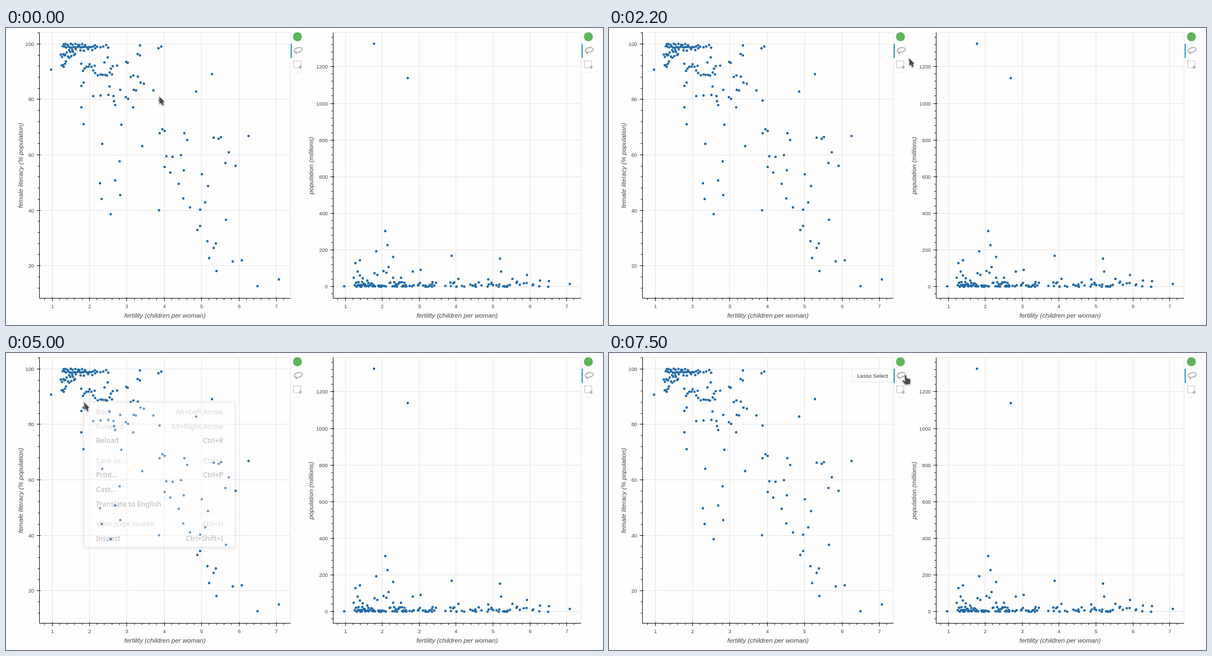
Recreate the animation shown at these times as an HTML page. Size 1061 px wide and 528 px high, loop 8000 ms.

```html
<!DOCTYPE html>
<html lang="en">
<head>
<meta charset="utf-8">
<title>Linked scatter plots</title>
<style>
  html, body { margin: 0; height: 100%; overflow: hidden; background: #fefefe; }
  svg { display: block; width: 1061px; height: 528px; }
  text { font: 9.3px "Liberation Sans", Arial, sans-serif; fill: #444; dominant-baseline: central; }
  .middle { text-anchor: middle; }
  .end { text-anchor: end; }
  .title { font-size: 11.5px; font-style: italic; text-anchor: middle; }
  .grid { stroke: #e5e5e5; fill: none; }
  .axis { stroke: #111; fill: none; }
  .dot { fill: #1f6aa9; }
  .icon { stroke: #a4a4a4; fill: none; stroke-width: 1.5; }
  .tip rect { fill: #fefefe; stroke: #e6e6e6; }
  .tip text { font-size: 9.6px; fill: #333; }
  .menu rect { fill: #fff; stroke: #c4c4c4; filter: drop-shadow(0 1px 3px #0005); }
  .menu text { font: 12.6px "Noto Sans", sans-serif; fill: #2e2e2e; }
  .menu .off { fill: #999; }
  .cursor { fill: #4c4c4c; stroke: #eee; stroke-width: .7; filter: drop-shadow(0 1px 1px #0004); }
</style>
</head>
<body>
<svg id="stage" viewBox="0 0 1061 528"></svg>
<script>
const stage = document.getElementById('stage');

function add(parent, tag, attrs = {}, text = '') {
  const node = document.createElementNS('http://www.w3.org/2000/svg', tag);
  for (const key in attrs) node.setAttribute(key, attrs[key]);
  node.textContent = text;
  return parent.appendChild(node);
}
const label = (parent, x, y, text, cls = '') => add(parent, 'text', { x, y, class: cls }, text);
const path = (parent, d, cls) => add(parent, 'path', { d, class: cls });
const group = cls => add(stage, 'g', { class: cls });
const show = (node, visible) => node.setAttribute('visibility', visible ? 'visible' : 'hidden');
const snap = v => Math.floor(v) + 0.5;

let seed = 77;
const random = () => (seed = seed * 16807 % 2147483647) / 2147483647;
const pairs = list => list.flatMap((x, i) => i % 2 ? [] : [[x, list[i + 1]]]);

// Scattered countries: fertility against literacy
const sparse = pairs([
  80,74, 238,31, 271,36, 276,33, 366,82,
  134,103, 138,97, 155,121, 168,120, 134,141, 138,171, 171,206, 167,276, 170,304, 186,331,
  184,104, 182,119, 191,121, 192,130, 194,137, 203,110, 213,123, 217,126, 227,110, 231,111,
  226,141, 205,172, 202,237, 194,271, 203,297, 239,97, 245,99, 262,111, 242,210, 273,129,
  338,113, 278,180, 282,183, 273,187, 285,228, 296,229, 311,226, 282,247, 292,257, 316,253,
  317,187, 322,199, 307,277, 315,303, 327,319, 272,324, 348,260, 359,281, 354,310, 345,323,
  345,352, 340,359, 369,195, 378,197, 382,194, 431,192, 396,221, 390,240, 408,245, 391,341,
  358,379, 373,383, 369,391, 361,409, 403,415, 419,413, 374,432, 447,459, 485,447
]);

// Crowded regions: count, x range, y range
const crowded = [
  [18, 100, 156, 32, 35], [10, 100, 142, 28, 31], [6, 156, 184, 30, 35], [8, 107, 163, 36, 41],
  [13, 96, 124, 42, 53], [5, 98, 108, 59, 71], [9, 133, 159, 61, 78], [8, 157, 190, 79, 88],
  [5, 172, 199, 48, 77], [2, 213, 217, 59, 62], [3, 216, 240, 83, 90], [2, 232, 240, 45, 54]
].flatMap(([n, x0, x1, y0, y1]) => Array.from({ length: n }, (_, i) => [
  x0 + (x1 - x0) * (i + 0.25 + random() * 0.5) / n,
  y0 + (y1 - y0) * random()
]));

const countries = [...sparse, ...crowded];

// Countries with a large population
const populous = pairs([
  654,28, 714,89, 674,361, 678,386, 658,397, 688,407, 629,413, 621,418, 680,425, 792,405,
  878,410, 737,430, 723,433, 625,433, 671,432, 676,435, 655,436, 660,439, 880,433, 926,439,
  900,446, 804,446, 857,447, 688,444, 702,444, 618,444, 629,440, 634,445, 642,449, 965,450,
  949,449, 937,456, 1002,455
]);
const small = countries
  .map(([x]) => [603 + (x - 82) * 0.988, 460 - 9 * random() ** 2])
  .filter(([x]) => !populous.some(p => Math.abs(p[0] - x) < 0.9));

function plot({ left, right, x1, dx, y0, perUnit, step, from, to, titleX, title, points }) {
  const top = 8, bottom = 480.5;
  const xAt = v => snap(x1 + (v - 1) * dx), yAt = v => snap(y0 - v * perUnit);
  add(stage, 'rect', { x: left, y: top, width: right - left, height: bottom - top, class: 'grid' });
  path(stage, `M${left} ${top}V${bottom}H${right}`, 'axis');

  for (let i = 0; ; i++) {
    const x = xAt(0.8 + i / 5 - 0.2 + 0.2);
    if (x > right) break;
    const major = i % 5 === 1;
    if (x < left) continue;
    if (major) {
      path(stage, `M${x} ${top}V${bottom}`, 'grid');
      label(stage, x, 494.5, (i + 4) / 5, 'middle');
    }
    path(stage, `M${x} ${major ? bottom - 2 : bottom}V${bottom + (major ? 5 : 3)}`, 'axis');
  }
  for (let i = from; i <= to; i++) {
    const y = yAt(i * step / 5), major = i % 5 === 0;
    if (major) {
      path(stage, `M${left} ${y}H${right}`, 'grid');
      label(stage, left - 9.5, y, i * step / 5, 'end');
    }
    path(stage, `M${major ? left + 2 : left} ${y}H${left - (major ? 5 : 3)}`, 'axis');
  }
  for (const [cx, cy] of points) add(stage, 'circle', { cx, cy, r: 2.2, class: 'dot' });

  label(stage, (left + right) / 2, 510.5, 'fertility (children per woman)', 'title');
  add(stage, 'text', { class: 'title', transform: `translate(${titleX} 244.5) rotate(-90)` }, title);
}

function toolbar(x) {
  const bar = add(stage, 'rect', { x: x - 12, y: 28, width: 2, height: 25, fill: '#2f96cc' });
  add(stage, 'circle', { cx: x, cy: 15.5, r: 8, fill: '#5fb45c' });
  add(stage, 'ellipse', { cx: x + 1.5, cy: 39, rx: 7.3, ry: 4.2, class: 'icon',
    transform: `rotate(-14 ${x + 1.5} 39)` });
  path(stage, `M${x - 4} 42q-1 2 1 2t1 3`, 'icon');
  add(stage, 'rect', { x: x - 6.5, y: 58.5, width: 12.5, height: 12.5, class: 'icon',
    'stroke-dasharray': '2 1.2', style: 'stroke-width:1.1' });
  path(stage, `M${x + 2} 69.5h6m-3 -3v6`, 'icon');
  path(stage, `M${x - 4} 78.5h9`, 'grid');
  return bar;
}

function tooltip(x, y, width, text) {
  const tip = group('tip');
  add(tip, 'rect', { x: x + 0.5, y: y + 0.5, width, height: 23 });
  label(tip, x + width / 2, y + 12, text, 'middle');
  return tip;
}

plot({ left: 59.5, right: 505.5, x1: 82, dx: 66.4, y0: 521.3, perUnit: 4.93, step: 20,
  from: 3, to: 26, titleX: 25.5, title: 'female literacy (% population)', points: countries });
plot({ left: 581.5, right: 1022, x1: 603, dx: 65.6, y0: 459.3, perUnit: 0.3253, step: 200,
  from: -1, to: 34, titleX: 542, title: 'population (millions)', points: [...populous, ...small] });

const lassoBar = toolbar(518);
toolbar(1035);
const lassoTip = tooltip(432, 28, 73, 'Lasso Select');
const boxTip = tooltip(957, 52, 65, 'Box Select');

const menu = group('menu');
add(menu, 'rect', { x: 138.5, y: 87.5, width: 268, height: 257.5 });
[
  [104, 'Back', 'Alt+Left Arrow', 'off'], [130, 'Forward', 'Alt+Right Arrow', 'off'],
  [155.5, 'Reload', 'Ctrl+R'], [191, 'Save as...', 'Ctrl+S', 'off'],
  [216.5, 'Print...', 'Ctrl+P'], [242.5, 'Cast...', ''], [268, 'Translate to English', ''],
  [303.5, 'View page source', 'Ctrl+U', 'off'], [329.5, 'Inspect', 'Ctrl+Shift+I']
].forEach(([y, name, keys, state = '']) => {
  label(menu, 160, y, name, state);
  label(menu, 386, y, keys, 'end ' + state);
});
path(menu, 'M139 172.5H406M139 285.5H406', 'grid');

const arrow = path(stage, 'M0 0L.5 14.5L3.5 12.5L5.5 17L8.5 15.5L7.5 11.5L9.5 9.5Z', 'cursor');
const hand = path(stage,
  'M-2 1Q0 -1 1.6 1L2.3 5.5L8 7Q9.5 8 9 11L8.3 16.5L0 17.5L-5.5 11.5Q-6 9 -3.5 9.5L-1 11Z', 'cursor');

// Cursor stops: time, x, y
const stops = [
  [0, 272, 121], [800, 450, 85], [900, 619, 96], [1100, 800, 85], [1200, 970, 63],
  [1400, 1028, 71], [1500, 1024, 56], [1800, 900, 65], [1900, 752, 65], [2100, 640, 60],
  [2200, 533, 53], [2400, 531, 50], [2500, 528, 48], [2600, 525, 47], [2900, 523, 43.5],
  [3600, 420, 65], [3700, 317, 86], [3900, 209, 90], [4100, 180, 90], [4200, 150, 89],
  [4300, 138.5, 87], [5500, 146, 82], [5600, 165, 69], [5700, 173, 63.5], [6400, 186, 79],
  [6500, 249, 85], [6700, 370, 55], [6800, 487, 26], [7000, 524, 36], [7100, 527, 39]
];

function draw(now) {
  const t = now % 8000;
  const within = (a, b) => t >= a && t < b;
  const [, x, y] = stops.findLast(stop => stop[0] <= t);
  const onBox = within(1400, 1800), onLasso = within(2400, 3600) || t >= 7000;

  show(boxTip, onBox);
  show(lassoTip, onLasso);
  show(lassoBar, !within(3400, 7500));
  show(menu, within(5000, 5800));
  menu.setAttribute('opacity', t < 5100 ? 0.35 : t < 5200 ? 0.8 : 1);
  show(hand, onBox || onLasso);
  show(arrow, !(onBox || onLasso));
  for (const cursor of [hand, arrow]) cursor.setAttribute('transform', `translate(${x} ${y})`);
  requestAnimationFrame(draw);
}
requestAnimationFrame(draw);
</script>
</body>
</html>
```
